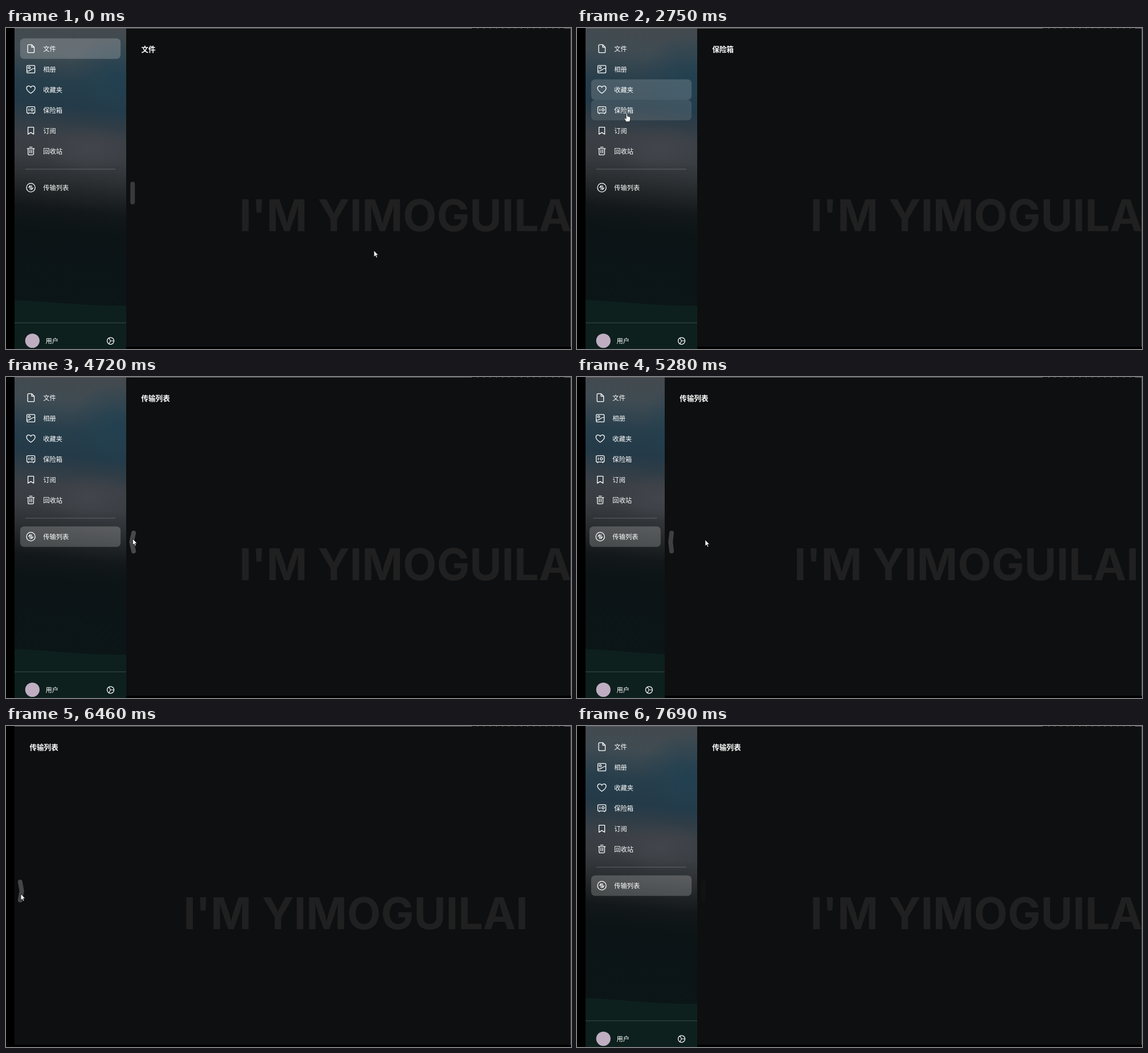
Animation of 992x564 px, one loop 8.25 s. Source, as an HTML page:

```html
<!DOCTYPE html>
<html lang="zh-CN">
<head>
<meta charset="utf-8">
<title>文件</title>
<style>
  html, body { margin: 0; width: 100%; height: 100%; overflow: hidden; background: #000; }
  svg { display: block; }
  text { font: 11.3px "Noto Sans CJK SC", "Noto Sans CJK JP", "Noto Sans CJK", sans-serif; fill: #fff; }
  #title { font-size: 12.6px; font-weight: 700; }
  #banner { font: 700 77px Inter, "Open Sans", sans-serif; fill: #202021; }
  .icon { fill: none; stroke: #fff; stroke-width: 1.3; stroke-linejoin: round; stroke-linecap: round; }
  .pointer { fill: #fff; stroke: #111; stroke-width: .8; stroke-linejoin: round; }
</style>
</head>
<body>
<svg width="992" height="564" viewBox="0 0 992 564">
  <defs>
    <linearGradient id="sky" gradientUnits="userSpaceOnUse" x1="113" y1="0" x2="57" y2="564">
      <stop offset="0" stop-color="#434a4f"/>
      <stop offset=".08" stop-color="#3f4b52"/>
      <stop offset=".17" stop-color="#273e4b"/>
      <stop offset=".24" stop-color="#243a48"/>
      <stop offset=".34" stop-color="#3b4046"/>
      <stop offset=".40" stop-color="#3a3d42"/>
      <stop offset=".46" stop-color="#2e3134"/>
      <stop offset=".56" stop-color="#13181a"/>
      <stop offset=".63" stop-color="#0c1416"/>
      <stop offset="1" stop-color="#0b1617"/>
    </linearGradient>
    <radialGradient id="blue">
      <stop offset="0" stop-color="#224050"/>
      <stop offset="1" stop-color="#224050" stop-opacity="0"/>
    </radialGradient>
    <radialGradient id="grey">
      <stop offset="0" stop-color="#42454b"/>
      <stop offset="1" stop-color="#42454b" stop-opacity="0"/>
    </radialGradient>
    <clipPath id="clip"><rect id="clipBox" x="15" y="0" height="564"/></clipPath>
  </defs>

  <rect x="15" width="977" height="560" fill="#0e0f10"/>
  <text id="banner" y="357">I'M YIMOGUILAI</text>
  <text id="title" y="41.6"></text>
  <path id="handle" fill="none" stroke="#47484a" stroke-width="8" stroke-linecap="round" stroke-linejoin="round"/>

  <g clip-path="url(#clip)">
    <rect x="15" width="196" height="564" fill="url(#sky)"/>
    <ellipse cx="195" cy="90" rx="85" ry="80" fill="url(#blue)"/>
    <ellipse cx="145" cy="212" rx="85" ry="42" fill="url(#grey)"/>
    <path d="M15 478C80 480 120 488 211 488V564H15Z" fill="#0d201d"/>
    <g id="rows"></g>
    <rect id="rule" y="247.5" height="1" fill="#fff" opacity=".22"/>
    <rect x="15" y="517.5" width="196" height="1" fill="#fff" opacity=".2"/>
    <circle cx="46.3" cy="549.5" r="12.6" fill="#bfaec2"/>
    <text x="69.5" y="554">用户</text>
    <g id="gear" class="icon">
      <circle r="6"/>
      <path d="M0 0H6M0 0L-3 -5.2M0 0L-3 5.2" stroke-width="1.1"/>
    </g>
  </g>

  <rect x="15" width="977" height="1" fill="#626466"/>
  <path d="M818 .5H980" stroke="#161617" stroke-dasharray="9 2"/>
  <rect x="991" width="1" height="560" fill="#4a4a4b"/>

  <g id="cursor">
    <path id="arrow" class="pointer" d="M0 0V11L2.5 8.8L4.2 12.6L6 11.8L4.3 8.1H7.6Z"/>
    <path id="hand" class="pointer" d="M-1.2 1.2Q0 -.8 1.2 1.2V5.4Q2.6 4.7 3.2 5.9Q4.5 5.3 5 6.5Q6.3 6.3 6.3 8V11L5 15H-1.2L-4.2 10Q-4.8 8.2 -3 8.4L-1.2 10Z"/>
  </g>
</svg>

<script>
const LOOP = 8250, LEFT = 15, FULL = 196, LEAVE = 7520;
const $ = id => document.getElementById(id);
const set = (el, k, v) => el.setAttribute(k, v);
const clamp = v => Math.min(1, Math.max(0, v));

const ring = (x, y, r) => `M${x - r} ${y}a${r} ${r} 0 1 0 ${2 * r} 0a${r} ${r} 0 1 0 ${-2 * r} 0`;
const frame = (top, bottom) =>
  `M-5.5 ${top}H5.5Q7 ${top} 7 ${top + 1.5}V${bottom - 1.5}Q7 ${bottom} 5.5 ${bottom}` +
  `H-5.5Q-7 ${bottom} -7 ${bottom - 1.5}V${top + 1.5}Q-7 ${top} -5.5 ${top}Z`;
const items = [
  ['文件', 'M-5.5 -5.5Q-5.5 -7 -4 -7H1.5L6 -2.5V5.5Q6 7 4.5 7H-4Q-5.5 7 -5.5 5.5ZM1.5 -7V-2.5H6'],
  ['相册', frame(-6.5, 6.5) + 'M-7 3.5C0 4 0 -1.5 7 -1.5' + ring(-2.7, -2.4, 1.7)],
  ['收藏夹', 'M0 6.5C-3 4.5 -7.5 1 -7.5 -2.5A3.9 3.9 0 0 1 0 -4A3.9 3.9 0 0 1 7.5 -2.5C7.5 1 3 4.5 0 6.5Z'],
  ['保险箱', frame(-6, 5) + 'M-4.5 5V6.5M4.5 5V6.5M-3.3 -2.3V1.3' + ring(2.1, -.5, 2.1)],
  ['订阅', 'M-5 -6H5V6.3L0 3.3L-5 6.3Z'],
  ['回收站', 'M-6.3 -4.5H6.3M-2.3 -7H2.3M-4.8 -4.5V5Q-4.8 6.5 -3.3 6.5H3.3Q4.8 6.5 4.8 5V-4.5M-1.6 -1.8V3.2M1.6 -1.8V3.2'],
  ['传输列表', ring(0, 0, 7.6) + 'M-1.2 3.5V-3.5L-3.8 -.3M1.2 -3.5V3.5L3.8 .3']
];
const rowY = i => i < 6 ? 36.3 + 36 * i : 280.5;

// The picture advances in 150 ms steps, counted anew from each burst of movement.
const STEP = 150, bursts = [0, 120, 1180, 1760, 2940, 5280, 6460, 7540];
function stepped(t) {
  const from = bursts.filter(b => b <= t).pop();
  return from + Math.floor((t - from) / STEP) * STEP;
}

// Pointer stops: time, x, y
const stops = [
  [120, 646, 391], [1030, 105, 146], [1330, 84, 80], [1760, 84, 80], [2180, 86, 110],
  [2750, 88, 166], [3420, 102, 280], [3560, 218, 281], [4840, 225, 286], [5280, 225, 286],
  [5580, 199, 289], [6310, 26, 295], [6760, 26, 295], [7450, 894, 545]
];
function pointer(t) {
  const n = stops.findIndex(s => s[0] > t);
  if (n < 1) return (n ? stops[stops.length - 1] : stops[0]).slice(1);
  const [t0, x0, y0] = stops[n - 1], [t1, x1, y1] = stops[n];
  const u = ((t - t0) / (t1 - t0)) ** 2;
  return [x0 + (x1 - x0) * u, y0 + (y1 - y0) * u];
}

// CSS "ease": cubic-bezier(.25, .1, .25, 1)
function ease(x) {
  if (x <= 0 || x >= 1) return clamp(x);
  const bez = (a, b, s) => 3 * a * s * (1 - s) ** 2 + 3 * b * s * s * (1 - s) + s ** 3;
  let lo = 0, hi = 1;
  for (let i = 0; i < 20; i++) {
    const mid = (lo + hi) / 2;
    if (bez(.25, .25, mid) < x) lo = mid; else hi = mid;
  }
  return bez(.1, 1, lo);
}
const toggled = (t, at) => ease((t - at) / 474);
const widthAt = t => FULL * (1 - toggled(t, 5186) + toggled(t, 6537));

function rowUnder(t) {
  const [x, y] = pointer(t), w = widthAt(t);
  if (x < LEFT + w * .05 || x > LEFT + w * .95) return -1;
  return items.findIndex((_, i) => Math.abs(y - rowY(i)) <= 18);
}
const inMain = t => t < LEAVE && pointer(t)[0] > LEFT + widthAt(t);
function onHandle(t) {
  const [x, y] = pointer(t);
  return Math.abs(x - LEFT - widthAt(t) - 11) < 3.8 && Math.abs(y - 290) < 20;
}

// Share of the last 200 ms for which a state held: a linear transition.
function recent(test, t) {
  let hits = 0;
  for (let k = 0; k < 10; k++) if (test(Math.max(0, t - 20 * k))) hits++;
  return hits / 10;
}

// Each click selects the next row down.
const clicks = [1760, 2180, 2630, 3010, 3150, 3290];
const selected = t => clicks.filter(c => c <= t).length;

function make(tag, attrs, parent) {
  const el = document.createElementNS('http://www.w3.org/2000/svg', tag);
  for (const k in attrs) set(el, k, attrs[k]);
  return parent.appendChild(el);
}
const rows = items.map(([name, d]) => {
  const g = make('g', {}, $('rows'));
  const box = make('rect', { y: -18, height: 36, rx: 7, fill: '#fff' }, g);
  make('path', { d, class: 'icon', transform: 'translate(18.8 0)' }, g);
  make('text', { x: 40.4, y: 4.2 }, g).textContent = name;
  return { g, box };
});

function draw(t) {
  const w = widthAt(t), edge = LEFT + w, pad = w * .05;
  set($('clipBox'), 'width', w);
  set($('rule'), 'x', LEFT + w * .096);
  set($('rule'), 'width', w * .808);
  set($('gear'), 'transform', `translate(${edge - 27.4} 549.8)`);
  set($('title'), 'x', edge + 26.4);
  set($('banner'), 'x', 313 + (edge - 18) / 2);
  $('title').textContent = items[selected(t)][0];

  rows.forEach(({ g, box }, i) => {
    // The new selection lights up only after the click.
    const active = recent(k => selected(k - 10) === i, t);
    const hover = recent(k => rowUnder(k) === i, t);
    set(g, 'transform', `translate(${LEFT + pad} ${rowY(i)})`);
    set(box, 'width', w - 2 * pad);
    set(box, 'opacity', Math.max(.2 * active, .13 * hover));
  });

  const near = recent(onHandle, t), d = near * (w > FULL / 2 ? 1.8 : -1.8), x = edge + 11.3;
  set($('handle'), 'd', `M${x + d} 274L${x - d} 290L${x + d} 306`);
  set($('handle'), 'opacity', .76 * recent(inMain, t) + .24 * near);

  const over = rowUnder(t) >= 0;
  set($('cursor'), 'transform', `translate(${pointer(t)})`);
  set($('cursor'), 'visibility', t < LEAVE ? 'visible' : 'hidden');
  set($('arrow'), 'opacity', over ? 0 : 1);
  set($('hand'), 'opacity', over ? 1 : 0);
}

const start = performance.now();
function loop() {
  draw(stepped((performance.now() - start) % LOOP));
  requestAnimationFrame(loop);
}
loop();
</script>
</body>
</html>
```
